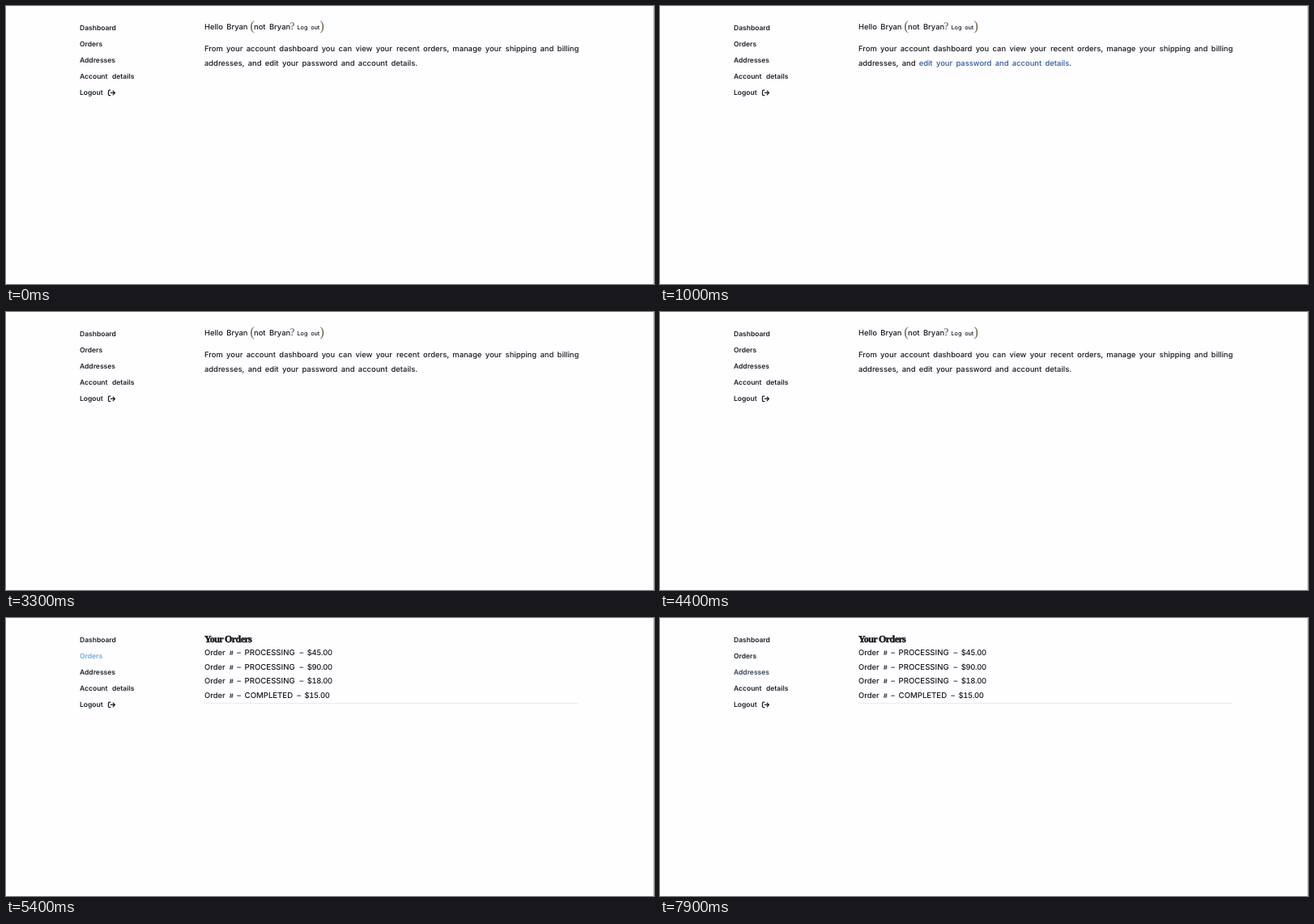
An HTML page that plays this animation: 800x344 px, repeating every 8 s.

```html
<!DOCTYPE html>
<html lang="en">
<head>
<meta charset="utf-8">
<title>Account dashboard</title>
<style>
  :root {
    --ink: #17191d;
    --menu: #1b2228;
    --link: #2f5a9c;
    --active: #6caadd;
  }
  html, body {
    margin: 0;
    width: 100%;
    height: 100%;
    overflow: hidden;
    background: #fefdff;
  }
  svg {
    display: block;
    width: 100%;
    height: 100%;
    font: 500 9.4px Inter, "Liberation Sans", sans-serif;
    word-spacing: 1.9px;
    text-rendering: geometricPrecision;
    fill: var(--ink);
  }

  .menu { font-size: 8.5px; font-weight: 600; word-spacing: 3.3px; fill: var(--menu); }
  .icon { fill: none; stroke: var(--menu); stroke-width: 1.3; stroke-linecap: round; stroke-linejoin: round; }
  .small { font-size: 7.2px; }
  .serif { font-family: "Liberation Serif", serif; font-weight: 400; fill: #4a4034; }
  .paren { font-size: 17px; fill: #75654f; }
  .mark { font-size: 13px; }
  .title { font: bold 12px "Liberation Serif", serif; letter-spacing: -.6px; word-spacing: 0; stroke: var(--ink); stroke-width: .5px; }
  .status { font-size: 9.6px; }
  .hash { font-size: 8px; }
  .price { letter-spacing: -.3px; font-variant-numeric: tabular-nums; }

  /* One shared 8 s clock; every change is a hard step */
  .home, .list, .edit, .recent, .ship, .orders, .addresses {
    animation: 8s step-end infinite;
  }
  .home { animation-name: home; }
  .list { animation-name: list; }
  .edit { animation-name: edit; }
  .recent { animation-name: recent; }
  .ship { animation-name: ship; }
  .orders { animation-name: orders; }
  .addresses { animation-name: addresses; }

  @keyframes home {
    0% { visibility: visible; }
    67.5%, 100% { visibility: hidden; }
  }
  @keyframes list {
    0% { visibility: hidden; }
    67.5%, 100% { visibility: visible; }
  }
  @keyframes edit {
    0%, 27.5%, 100% { fill: var(--ink); }
    10% { fill: #1d2a42; }
    11.25% { fill: #284a7f; }
    12.5% { fill: var(--link); }
  }
  @keyframes recent {
    0%, 41.25%, 100% { fill: var(--ink); }
    32.5% { fill: #1d2a42; }
    33.75% { fill: #284a7f; }
    35% { fill: var(--link); }
  }
  @keyframes ship {
    0%, 55%, 100% { fill: var(--ink); }
    41.25% { fill: #191d26; }
    42.5% { fill: #284a7f; }
    43.75% { fill: var(--link); }
  }
  @keyframes orders {
    0%, 95%, 100% { fill: var(--menu); }
    63.75% { fill: var(--active); }
    80% { fill: #3c5d7a; }
    81.25% { fill: #1f2830; }
  }
  @keyframes addresses {
    0%, 63.75% { fill: var(--menu); }
    61.25% { fill: var(--active); }
    98.75%, 100% { fill: #344052; }
  }
</style>
</head>
<body>
<svg viewBox="0 0 800 344" preserveAspectRatio="none">
  <rect x="799" width="1" height="344" fill="#c6c5ca"/>

  <g class="menu">
    <text x="91" y="29.9">Dashboard</text>
    <text x="91" y="50" class="orders">Orders</text>
    <text x="91" y="70.1" class="addresses">Addresses</text>
    <text x="91" y="90.1">Account details</text>
    <text x="91" y="110.2">Logout</text>
    <path class="icon" d="M128.8 104.1h-1.2q-1.1 0-1.1 1.1v4.4q0 1.1 1.1 1.1h1.2M129.4 107.4h4.8M132.2 105.1l2.3 2.3l-2.3 2.3"/>
  </g>

  <g class="home">
    <text x="245" y="28.5">Hello Bryan</text>
    <text x="301.3" y="29.6" class="serif paren">(</text>
    <text x="306" y="28.5">not Bryan</text>
    <text x="350.4" y="28.5" class="serif mark">?</text>
    <text x="359.5" y="28.5" class="small">Log out</text>
    <text x="387.2" y="29.6" class="serif paren">)</text>

    <text x="245" y="56.3">From your account dashboard you can view your <tspan x="482" class="recent">recent orders</tspan>, manage your <tspan x="616.6" class="ship">shipping and billing</tspan></text>
    <text x="245" y="73.9"><tspan class="ship">addresses</tspan>, and <tspan x="319.7" class="edit">edit your password and account details</tspan>.</text>
  </g>

  <g class="list">
    <text x="245" y="30.4" class="title">Your Orders</text>
    <g id="rows"></g>
    <rect x="245" y="105" width="462" height="1" fill="#e9e8ec"/>
  </g>
</svg>
<script>
  const rows = [
    ["PROCESSING", "$45.00"],
    ["PROCESSING", "$90.00"],
    ["PROCESSING", "$18.00"],
    ["COMPLETED", "$15.00"]
  ];
  document.getElementById("rows").innerHTML = rows.map(([status, price], i) => {
    const y = 46.2 + i * 17.6;
    const dash = status === "COMPLETED" ? 359.2 : 362.4;
    return `<text y="${y}"><tspan x="245">Order</tspan><tspan x="275.7" class="hash">#</tspan>` +
      `<tspan x="285.3">–</tspan><tspan x="294.6" class="status">${status}</tspan>` +
      `<tspan x="${dash}">–</tspan><tspan x="${dash + 9.3}" class="price">${price}</tspan></text>`;
  }).join("");
</script>
</body>
</html>
```
